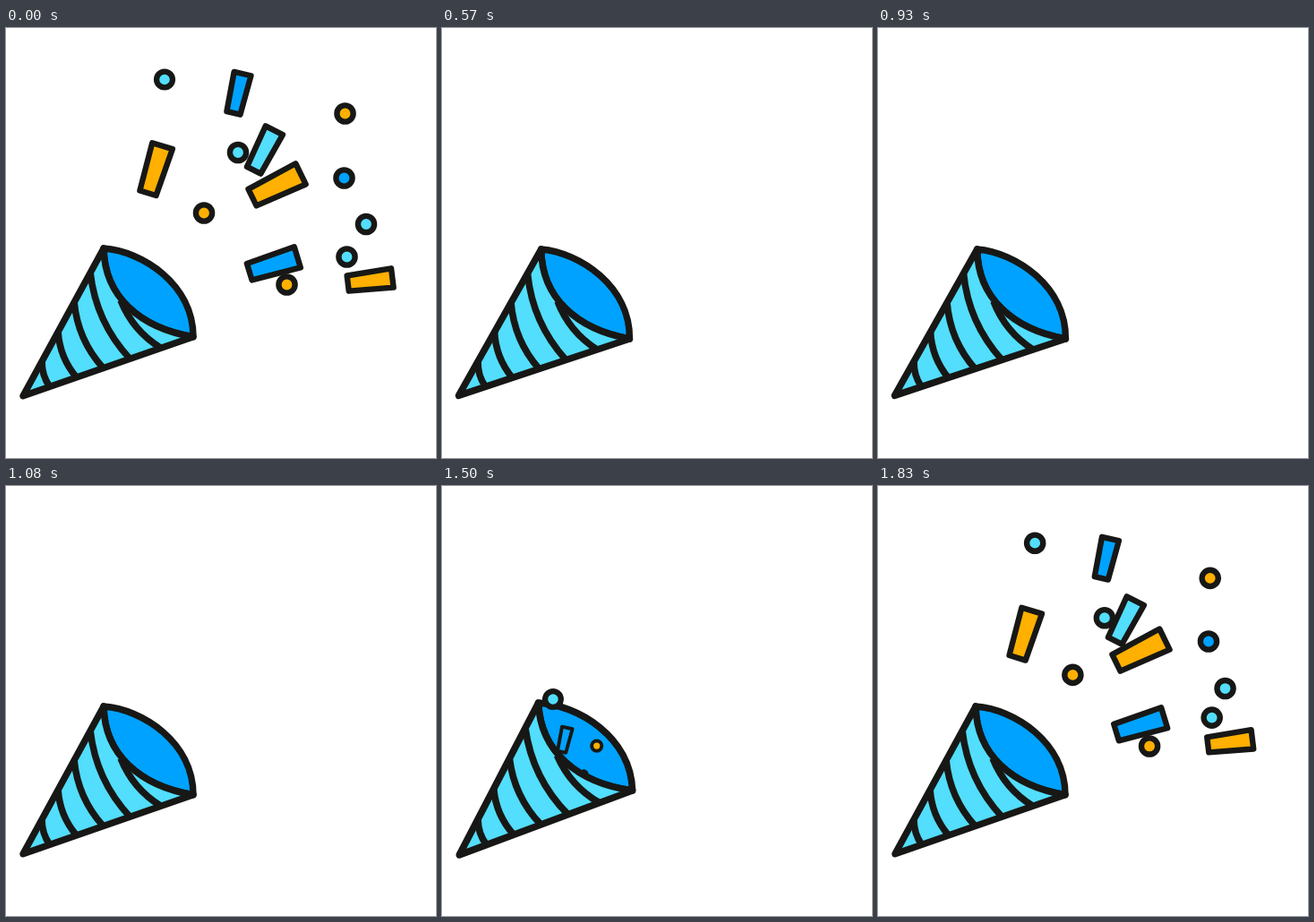
An HTML page with a canvas for the animation above (1.86 s loop, 480x480 px).

```html
<!DOCTYPE html>
<html>
<head>
<meta charset="utf-8">
<title>Party popper</title>
<style>
html, body { margin: 0; width: 100%; height: 100%; overflow: hidden; background: #fff; }
canvas { display: block; width: 100vw; height: 100vh; object-fit: contain; }
</style>
</head>
<body>
<canvas id="stage" width="480" height="480"></canvas>
<script>
const ctx = document.getElementById('stage').getContext('2d');
const LOOP = 1860, STEP = 30, FLIGHT = 785;
const INK = '#171816', CYAN = '#52defc', BLUE = '#00a2ff', GOLD = '#ffb000';

const TIP = [19, 410.7], TOP = [109, 246], SIDE = [209, 344.7];
const PIVOT = [40, 375], MUZZLE = [84, 374];

// A piece passes (x, y) as the loop restarts; order sets when it is fired.
const dot = (color, x, y, order) => ({ color, x, y, order });
const strip = (color, x, y, order, angle, length) =>
  ({ color, x, y, order, angle: -angle * Math.PI / 180, length });

const confetti = [
  dot(CYAN, 177, 57.5, 0),
  dot(GOLD, 378.5, 95.5, 1.5),
  dot(CYAN, 259, 139, 3),
  dot(BLUE, 377.5, 167.5, 2),
  dot(GOLD, 221, 206.5, 1.5),
  dot(CYAN, 402, 219, 4.5),
  dot(CYAN, 380.5, 255.5, 1.5),
  dot(GOLD, 313.5, 286.5, 4.5),
  strip(BLUE, 259, 73, 1.5, 77, 45),
  strip(GOLD, 166.5, 158, 3, 73, 55),
  strip(CYAN, 288, 136.5, 6, 63, 50),
  strip(GOLD, 302, 176, 4, 26, 60),
  strip(BLUE, 298.5, 264, 1.5, 17, 56),
  strip(GOLD, 406.5, 282, 4, 7, 50)
];

const clamp = v => Math.max(0, Math.min(1, v));
const ease = v => (1 - Math.cos(Math.PI * clamp(v))) / 2;
const easeOut = v => 1 - Math.pow(1 - clamp(v), 3);
const mix = (a, b, k) => a.map((v, i) => v + (b[i] - v) * k);

// Poses hold angle, x scale and y scale
const REST = [0, 1, 1], LEAN = [.054, 1, 1];
const SQUASH = [.025, .95, .9], STRETCH = [-.028, 1.031, 1.025];

function popperPose(t) {
  if (t < 1080) return mix(REST, LEAN, t > 540 ? ease((t - 540) / 90 % 2 < 1
    ? (t - 540) / 90 % 2 : 2 - (t - 540) / 90 % 2) : 0);
  if (t < 1350) return mix(REST, SQUASH, ease((t - 1170) / 180));
  if (t < 1530) return mix(SQUASH, STRETCH, ease((t - 1350) / 180));
  return mix(STRETCH, REST, ease((t - 1530) / 210));
}

function posed([angle, sx, sy], draw) {
  ctx.save();
  ctx.translate(...PIVOT);
  ctx.rotate(angle);
  ctx.scale(sx, sy);
  ctx.translate(-PIVOT[0], -PIVOT[1]);
  ctx.lineWidth = 7.5;
  draw();
  ctx.restore();
}

function paint(path, fill) {
  ctx.fillStyle = fill;
  ctx.fill(path);
  ctx.stroke(path);
}

const frontRim = `M${TOP}C110 300 150 335 ${SIDE}`;
const mouth = new Path2D(`${frontRim}C209 286 152 249 ${TOP}Z`);
const front = new Path2D(`${frontRim}L${TIP}Z`);

// A stripe sags by a fixed share of its length
function stripe(path, [x0, y0], [x1, y1]) {
  const sag = .165, dx = x1 - x0, dy = y1 - y0;
  path.moveTo(x0, y0);
  path.quadraticCurveTo(x0 + dx / 2 - dy * sag, y0 + dy / 2 + dx * sag, x1, y1);
}

const stripes = new Path2D();
for (let i = 1; i <= 4; i++) {
  stripe(stripes, mix(TIP, TOP, .035 + .2 * i), mix(TIP, SIDE, .157 * i));
}
stripe(stripes, [128, 304], mix(TIP, SIDE, .81));

function body() {
  ctx.fillStyle = CYAN;
  ctx.fill(front);
  ctx.stroke(stripes);
  ctx.stroke(front);
}

function pieceShape({ length, angle }) {
  const path = new Path2D();
  if (!length) {
    path.arc(0, 0, 9.1, 0, Math.PI * 2);
    return path;
  }
  const half = length / 2, wide = length * .215, slim = wide * .8;
  const outline = new Path2D();
  outline.moveTo(half, -wide);
  outline.lineTo(half, wide);
  outline.lineTo(-half, slim);
  outline.lineTo(-half, -slim);
  outline.closePath();
  path.addPath(outline, new DOMMatrix().rotate(angle * 180 / Math.PI));
  return path;
}
for (const p of confetti) p.path = pieceShape(p);

function drawPiece(p, t) {
  const start = 1375 + 30 * p.order, end = 2135 + 20 * p.order;
  if (t <= start || t >= end) return;
  const travel = time => easeOut((time - start) / FLIGHT);
  const size = ease((t - start) / 140) * ease((end - t) / 300);
  ctx.save();
  ctx.translate(...mix(MUZZLE, [p.x, p.y], travel(t) / travel(LOOP)));
  ctx.scale(size, size);
  ctx.lineWidth = 6.4;
  paint(p.path, p.color);
  ctx.restore();
}

function drawConfetti(t) {
  ctx.save();
  // Keeps pieces inside the popper until they leave its mouth
  ctx.clip(new Path2D('M19 411L100 246L60 0H480V480L209 350Z'));
  for (const p of confetti) drawPiece(p, t);
  ctx.restore();
}

function render(t) {
  ctx.fillStyle = '#fff';
  ctx.fillRect(0, 0, 480, 480);
  ctx.lineJoin = 'round';
  ctx.strokeStyle = INK;
  const pose = popperPose(t);
  posed(pose, () => paint(mouth, BLUE));
  drawConfetti(t < 700 ? t + LOOP : t);
  posed(pose, body);
}

const began = performance.now();
function tick() {
  const t = (performance.now() - began + 1) % LOOP;
  render(Math.floor(t / STEP) * STEP);
  requestAnimationFrame(tick);
}
tick();
</script>
</body>
</html>
```
